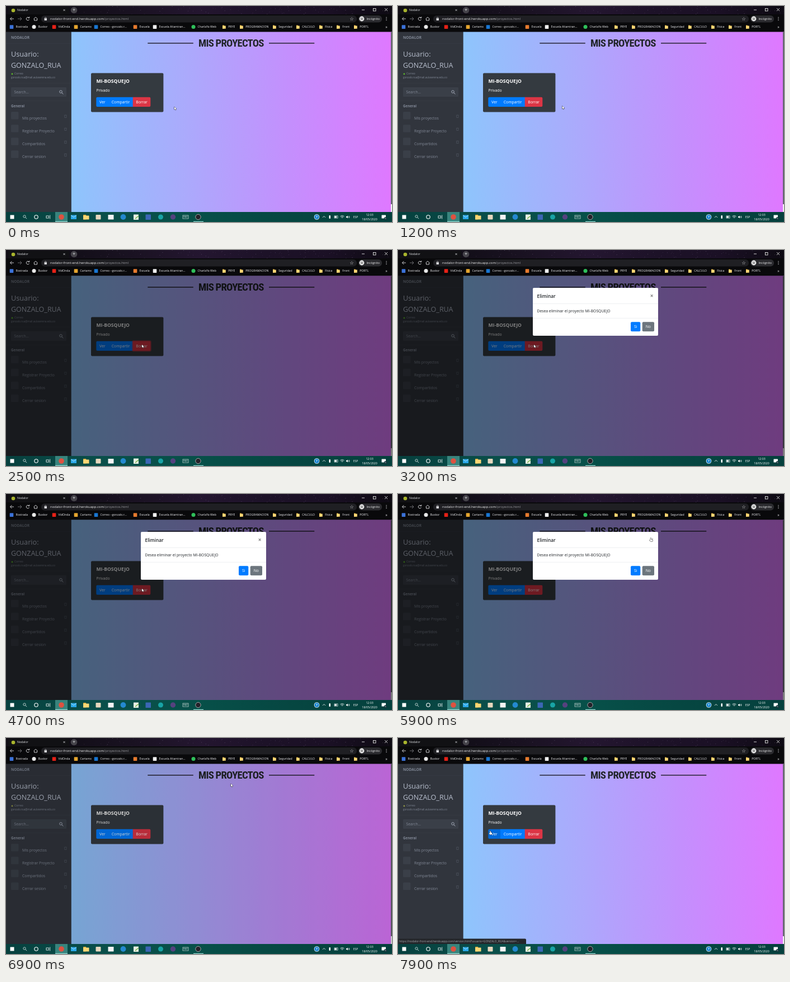
An HTML page with a canvas for the animation above (8000 ms loop, 690 px wide and 388 px high).

```html
<!DOCTYPE html>
<html lang="es">
<head>
<meta charset="utf-8">
<title>Nodalor</title>
<style>
html, body { margin: 0; width: 100%; height: 100%; overflow: hidden; background: #000; }
canvas { display: block; width: 690px; height: 388px; }
</style>
</head>
<body>
<canvas id="stage"></canvas>
<script>
const W = 690, H = 388, LOOP = 8000, STEP = 100;
const TOP = 46.6, BOTTOM = 370, SIDE = 116.5;
const SANS = '"Open Sans", "Noto Sans", sans-serif';
const NARROW = '"Roboto Condensed", Roboto, sans-serif';
const USER = 'GONZALO_RUA', PROJECT = 'MI-BOSQUEJO', HOST = 'nodalor-front-end.herokuapp.com';

const canvas = document.getElementById('stage');
const ctx = canvas.getContext('2d');
const dpr = window.devicePixelRatio || 1;
canvas.width = W * dpr;
canvas.height = H * dpr;
ctx.scale(dpr, dpr);

function rect(x, y, w, h, color, r = 0) {
  ctx.fillStyle = color;
  ctx.beginPath();
  ctx.roundRect(x, y, w, h, r);
  ctx.fill();
}

function dot(x, y, r, color) {
  ctx.fillStyle = color;
  ctx.beginPath();
  ctx.arc(x, y, r, 0, 7);
  ctx.fill();
}

function ring(x, y, r, color, width = 1) {
  ctx.strokeStyle = color;
  ctx.lineWidth = width;
  ctx.beginPath();
  ctx.arc(x, y, r, 0, 7);
  ctx.stroke();
}

// points: flat list x0, y0, x1, y1, ...
function path(points) {
  ctx.beginPath();
  for (let i = 0; i < points.length; i += 2) ctx.lineTo(points[i], points[i + 1]);
}

function line(color, width, ...points) {
  ctx.strokeStyle = color;
  ctx.lineWidth = width;
  path(points);
  ctx.stroke();
}

// y is the optical middle of the line
function text(str, x, y, size, color, weight = 400, align = 'left') {
  ctx.font = `${weight} ${size}px ${SANS}`;
  ctx.textAlign = align;
  ctx.fillStyle = color;
  ctx.fillText(str, x, y + size * 0.35);
  return ctx.measureText(str).width;
}

function gradient(x0, x1, ...colors) {
  const g = ctx.createLinearGradient(x0, 0, x1, 0);
  colors.forEach((c, i) => g.addColorStop(i / (colors.length - 1), c));
  return g;
}

function magnifier(x, y, r, color) {
  ring(x, y, r, color, 0.8);
  line(color, 0.9, x + r * 0.7, y + r * 0.7, x + r * 1.9, y + r * 1.9);
}

function folder(x, y, w, h) {
  rect(x, y, w * 0.5, h, '#e0ae3c', 0.5);
  rect(x, y + h * 0.18, w, h * 0.82, '#fbd775', 0.5);
}

function random(seed) {
  return () => (seed = (seed * 16807) % 2147483647) / 2147483647;
}

const clamp = v => Math.min(1, Math.max(0, v));
const ramp = (t, from, to) => clamp((t - from) / (to - from));
const smooth = p => p * p * (3 - 2 * p);
const easeOut = p => 1 - (1 - p) ** 2;

const cursorKeys = [
  [0, 301, 181], [1000, 301, 181], [1900, 243, 170], [4900, 243, 170],
  [5700, 452, 79], [6550, 452, 79], [6900, 402, 82], [7600, 165, 167], [LOOP, 165, 167]
];

function cursorAt(t) {
  const i = cursorKeys.findIndex(k => k[0] > t);
  const [t0, x0, y0] = cursorKeys[i - 1], [t1, x1, y1] = cursorKeys[i];
  const p = smooth(ramp(t, t0, t1));
  return { x: x0 + (x1 - x0) * p, y: y0 + (y1 - y0) * p };
}

const inside = (c, x, y, w, h) => c.x >= x && c.x < x + w && c.y >= y && c.y < y + h;

function drawStars() {
  rect(0, 0, W, 47, gradient(0, W, '#100d14', '#120e18', '#1a1222', '#241630', '#1d1228', '#1b1025', '#0d0a12'));
  const rnd = random(77);
  for (let i = 0; i < 110; i++) {
    const x = 115 + rnd() * 575, y = rnd() * 15, a = 0.12 + rnd() * 0.4;
    rect(x, y, 0.7, 0.7, `rgba(205,180,225,${a})`);
  }
}

function drawBrowser() {
  drawStars();
  rect(4, 1, 109, 16, '#111114', 3);
  rect(0, 15, W, 32, '#09090b');
  dot(13, 8, 3.3, '#a9b52d');
  text('Nodalor', 20, 7.5, 5.2, '#e8eaed', 500);
  text('×', 104, 7.3, 8, '#e8eaed', 400, 'center');
  dot(121.5, 7.5, 5.8, '#45434a');
  text('+', 121.5, 7.2, 9, '#e8eaed', 400, 'center');
  line('#fff', 0.8, 636, 7, 641, 7);
  ctx.strokeRect(656.5, 4.5, 4.5, 4.5);
  line('#fff', 0.8, 677, 4, 682, 9);
  line('#fff', 0.8, 682, 4, 677, 9);

  const ink = '#d8d8dc';
  line(ink, 0.9, 14, 23, 7.5, 23);
  line(ink, 0.9, 10.5, 20, 7.5, 23, 10.5, 26);
  line('#77777b', 0.9, 21, 23, 28, 23);
  line('#77777b', 0.9, 25, 20, 28, 23, 25, 26);
  ctx.strokeStyle = ink;
  ctx.beginPath();
  ctx.arc(39, 23, 2.8, 0.4, 5.6);
  ctx.stroke();
  line(ink, 0.9, 39.5, 21.5, 41.8, 21.5, 41.8, 19.2);
  line(ink, 0.9, 49.5, 23, 53, 20, 56.5, 23);
  line(ink, 0.9, 50.5, 23, 50.5, 26, 55.5, 26, 55.5, 23);
  rect(63, 17, 564, 12.5, '#1f1f23', 6);
  rect(68.5, 22, 4.5, 4, ink, 0.5);
  ring(70.75, 21.8, 1.5, ink, 0.7);
  const hostWidth = text(HOST, 79, 23, 6, '#f1f1f3', 500);
  text('/proyectos.html', 79 + hostWidth, 23, 6, '#98989e');
  text('☆', 618, 22.7, 8.5, '#f1f1f3', 400, 'center');
  rect(630, 17, 42, 12.5, '#2b2b2f', 6);
  dot(636, 23, 4.4, '#f1f1f1');
  rect(633.5, 21.4, 5, 0.8, '#333');
  ring(634.8, 24, 0.8, '#333', 0.6);
  ring(637.2, 24, 0.8, '#333', 0.6);
  text('Incógnito', 644.5, 23, 5.4, '#f1f1f3', 500);
  for (const y of [20.5, 23, 25.5]) dot(680, y, 0.65, ink);
  drawBookmarks();
}

function drawBookmarks() {
  const sites = [
    [10, '#3b72d9', 'Rostrada'], [50, '#e8e8e8', 'Buskor'], [86, '#e62117', 'VidOnda'],
    [125, '#e5a52f', 'Cartamx'], [161, '#1976d2', 'Correo ~gonzalo.r...'],
    [231, '#e67a2e', 'Escuela'], [266, '#f0f0f0', 'Escuela Altamiran...'], [335, '#2fc05a', 'CharlaYa Web']
  ];
  sites.forEach(([x, color, label], i) => {
    if (i === 1 || i === 7) dot(x, 37.6, 3.5, color);
    else rect(x - 3.3, 34.3, 6.6, 6.6, color, 0.7);
    text(label, x + 7.5, 37.4, 5.2, '#f1f1f4', 500);
  });
  const folders = [
    [390, 'PRYE'], [421, 'PROGRAMACION'], [480, 'Seguridad'], [522, 'CALCULO'],
    [563, 'Física'], [594, 'Front'], [625, 'PORTL']
  ];
  for (const [x, label] of folders) {
    folder(x - 3, 34.5, 5.8, 6.2);
    text(label, x + 7.2, 37.4, 5.2, '#f1f1f4', 500);
  }
  text('»', 680, 37.3, 7, '#f1f1f4', 400, 'center');
}

function drawSidebar(t) {
  rect(0, TOP, SIDE, BOTTOM - TOP, '#31353d');
  const muted = '#818896', light = '#b8bfce';
  text('NODALOR', 9, 57, 6.6, muted, 700);
  rect(0, 67, SIDE, 0.5, '#3a3f48');
  text('Usuario:', 9, 86.7, 12.7, light);
  text(USER, 9, 106.5, 12.5, light);
  dot(11, 122, 1.5, t < 6700 ? '#5cb22c' : '#8d9148');
  text('Correo', 15, 121.7, 4.9, muted);
  text('gonzalo.rua@mail.aulaserena.edu.co', 9, 128.8, 4.6, muted);
  rect(0, 138, SIDE, 0.5, '#3a3f48');
  rect(9, 146, 99, 17, '#3a3f48', 1.5);
  text('Search...', 14.5, 155, 6.7, muted);
  magnifier(98, 154, 2.3, light);
  rect(0, 170, SIDE, 0.5, '#3a3f48');
  text('General', 9, 180, 6.2, muted, 700);
  ['Mis proyectos', 'Registrar Proyecto', 'Compartidos', 'Cerrar sesion'].forEach((label, i) => {
    const y = 201 + i * 23.2;
    rect(9, y - 11, 13.5, 13.5, '#3a3f48', 1.5);
    text(label, 29, y + 0.2, 6.8, muted);
    ctx.strokeStyle = '#565c68';
    ctx.lineWidth = 0.6;
    ctx.strokeRect(104.8, y - 5, 3.2, 4.4);
  });
}

function drawHeading() {
  const title = 'MIS PROYECTOS', room = 118;
  let size = 21;
  ctx.letterSpacing = '-0.8px';
  do ctx.font = `bold condensed ${size -= 0.25}px ${NARROW}`; while (ctx.measureText(title).width > room);
  ctx.fillStyle = '#212529';
  ctx.textAlign = 'center';
  ctx.fillText(title, 402.3, 66.3 + size * 0.36);
  ctx.letterSpacing = '0px';
  rect(253.3, 66, 81.5, 1.4, '#24222f');
  rect(470, 66, 81.3, 1.4, '#24222f');
}

function drawPage(t, cursor, open) {
  rect(SIDE, TOP, W - SIDE, BOTTOM - TOP, gradient(SIDE, W, '#8ec5fc', '#a9acfc', '#c390fd', '#df78ff'));
  drawHeading();
  rect(152, 120.5, 129.4, 69.9, '#343a40', 2);
  text(PROJECT, 161.5, 135.3, 8.6, '#fff', 700);
  text('Privado', 161.5, 152, 6.8, '#fff');
  const hover = (x, w) => !open && inside(cursor, x, 164, w, 17);
  const overView = hover(161, 22), overShare = hover(183, 44), overDelete = hover(227, 31);
  rect(161.3, 163.8, 22, 17.2, overView ? '#0069d9' : '#007bff', [2, 0, 0, 2]);
  rect(183, 163.8, 44, 17.2, overShare ? '#0069d9' : '#007bff');
  if (t >= 2400 && t < 2700) rect(225.2, 162.3, 34.6, 20.2, 'rgba(220,53,69,.5)', 3);
  rect(226.7, 163.8, 31.6, 17.2, overDelete ? '#c82333' : '#dc3545', [0, 2, 2, 0]);
  text('Ver', 172.3, 172.8, 6.8, '#fff', 400, 'center');
  text('Compartir', 205, 172.8, 6.8, '#fff', 400, 'center');
  text('Borrar', 242.5, 172.8, 6.8, '#fff', 400, 'center');
  rect(688, TOP, 2, 356 - TOP, '#62626c');
  rect(688, 356, 2, 14, '#f1f1f1');
  return overView || overShare || overDelete;
}

function drawModal(shown) {
  if (shown <= 0) return;
  ctx.save();
  ctx.globalAlpha = shown;
  ctx.beginPath();
  ctx.rect(0, TOP, W, BOTTOM - TOP);
  ctx.clip();
  ctx.translate(0, (shown - 1) * 22);
  rect(241, 68, 224, 86, '#fff', 2);
  text('Eliminar', 248.5, 83, 8.3, '#212529', 600);
  text('×', 453.5, 82, 10, '#7f7f7f', 700, 'center');
  rect(241, 96, 224, 0.6, '#dee2e6');
  text(`Desea eliminar el proyecto ${PROJECT}`, 248.5, 110, 6.8, '#212529');
  rect(241, 122, 224, 0.6, '#dee2e6');
  rect(416, 129.3, 17.3, 17, '#007bff', 2);
  text('Sì', 424.6, 138, 6.8, '#fff', 400, 'center');
  rect(436.7, 129.3, 21.3, 17, '#6c757d', 2);
  text('No', 447.3, 138, 6.8, '#fff', 400, 'center');
  ctx.restore();
}

function drawTaskbar() {
  rect(0, BOTTOM, W, 18, gradient(0, W, '#06403e', '#0a4f4a', '#075049', '#064641', '#05403d'));
  rect(88, 370, 22, 18, '#38847d');
  rect(88, 386.7, 22, 1.3, '#8fd4cc');
  rect(335, 386.7, 18, 1.3, '#8fd4cc');
  const y = 379;
  rect(7.5, y - 3.5, 7, 7, '#fff');
  magnifier(33, y - 1, 2.2, '#dfe9e8');
  ring(54, y, 3.2, '#fff', 1.1);
  ctx.strokeStyle = '#fff';
  ctx.lineWidth = 0.8;
  ctx.strokeRect(72, y - 2, 4.5, 4);
  line('#fff', 0.8, 78.7, y - 3.5, 78.7, y + 3.5);
  dot(99, y, 4.8, '#df5140');
  rect(116, y - 3.5, 10, 7.5, '#2aa8e8', 0.5);
  line('#e6f6ff', 0.7, 116, y - 3.2, 121, y + 0.5, 126, y - 3.2);
  folder(138, y - 4, 10.5, 8.5);
  rect(160.5, y - 4, 9, 8.5, '#e6d7bd', 1);
  rect(182.5, y - 4, 10, 8.5, '#f4f4f4', 0.5);
  dot(209.5, y, 4.9, '#2489d0');
  rect(228, y - 4.5, 9, 9.5, '#e8efe4', 0.5);
  line('#76b545', 1.4, 231, y + 3, 237, y - 2);
  rect(249.5, y - 4.5, 9.5, 9.5, '#3b66b5', 0.5);
  dot(276.5, y, 4.5, '#18a3a5');
  dot(298.5, y, 4.7, '#55427f');
  ctx.strokeStyle = '#d5dedd';
  ctx.lineWidth = 0.7;
  ctx.strokeRect(316, y - 3, 10, 6);
  text('RAD', 321, y, 3.8, '#e5eceb', 400, 'center');
  dot(343.5, y, 4.9, '#24222a');
  ring(343.5, y, 4.7, '#d8d8d8', 0.7);
  drawTray(y);
}

function drawTray(y) {
  dot(555.5, y, 4.8, '#fff');
  dot(555.5, y, 4, '#1683cf');
  text('?', 555.5, y, 6, '#fff', 700, 'center');
  line('#fff', 0.8, 566, y + 1, 568.5, y - 1.5, 571, y + 1);
  rect(577.5, y - 3, 2.5, 6, '#fff', 1);
  ctx.strokeStyle = '#fff';
  ctx.lineWidth = 0.7;
  ctx.strokeRect(587, y - 2, 6, 4);
  rect(587.5, y - 1.5, 3.5, 3, '#fff');
  for (const r of [1.5, 3.2, 5]) {
    ctx.beginPath();
    ctx.arc(601, y + 2.5, r, -2.4, -0.75);
    ctx.stroke();
  }
  path([608, y - 1, 609.5, y - 1, 611, y - 2.5, 611, y + 2.5, 609.5, y + 1, 608, y + 1]);
  ctx.fillStyle = '#fff';
  ctx.fill();
  for (const r of [1.5, 3]) {
    ctx.beginPath();
    ctx.arc(611, y, r, -0.8, 0.8);
    ctx.stroke();
  }
  text('ESP', 625, y, 5, '#fff', 400, 'center');
  text('12:03', 650, 375, 5.2, '#fff', 400, 'center');
  text('18/05/2020', 650, 383.3, 5.2, '#fff', 400, 'center');
  rect(671.5, y - 3.5, 7.5, 6, '#fff', 0.5);
  dot(678.5, y + 2.7, 2.6, '#12343a');
  text('5', 678.5, y + 2.7, 4, '#fff', 400, 'center');
}

function drawStatus() {
  rect(0, 360.5, 229, 9.5, '#25272b', [0, 2, 0, 0]);
  text(`https://${HOST}/version.html?usuario=${USER}&version=...`, 2, 365.3, 5, '#a4a7ad');
}

function drawCursor({ x, y }, hand) {
  ctx.save();
  ctx.translate(x, y);
  path(hand
    ? [-0.7, 0, 0.5, 0, 0.7, 2.5, 2.6, 3, 3, 4, 2.6, 6.5, -0.7, 6.5, -2.5, 4.2, -1.8, 3.6, -0.8, 4.5]
    : [0, 0, 0, 5.2, 1.2, 4.1, 2, 6, 2.9, 5.6, 2.1, 3.8, 3.8, 3.7]);
  ctx.closePath();
  ctx.lineJoin = 'round';
  ctx.lineWidth = 0.9;
  ctx.strokeStyle = '#111';
  ctx.stroke();
  ctx.fillStyle = '#fff';
  ctx.fill();
  ctx.restore();
}

function draw(t) {
  const cursor = cursorAt(t);
  const dim = 0.5 * (ramp(t, 2350, 2500) - ramp(t, 6800, 6950));
  const modal = easeOut(ramp(t, 2500, 2800)) - easeOut(ramp(t, 6500, 6800));
  drawBrowser();
  const overButton = drawPage(t, cursor, dim > 0);
  drawSidebar(t);
  rect(0, TOP, W, BOTTOM - TOP, `rgba(0,0,0,${dim})`);
  drawModal(modal);
  if (t >= 7700) drawStatus();
  drawTaskbar();
  const overClose = modal > 0 && inside(cursor, 446, 74, 14, 16);
  drawCursor(cursor, overButton || overClose);
}

const start = performance.now();
let shownTime = -1;
function tick() {
  const t = Math.floor(((performance.now() - start) % LOOP) / STEP) * STEP;
  if (t !== shownTime) draw(shownTime = t);
  requestAnimationFrame(tick);
}
tick();
</script>
</body>
</html>
```
